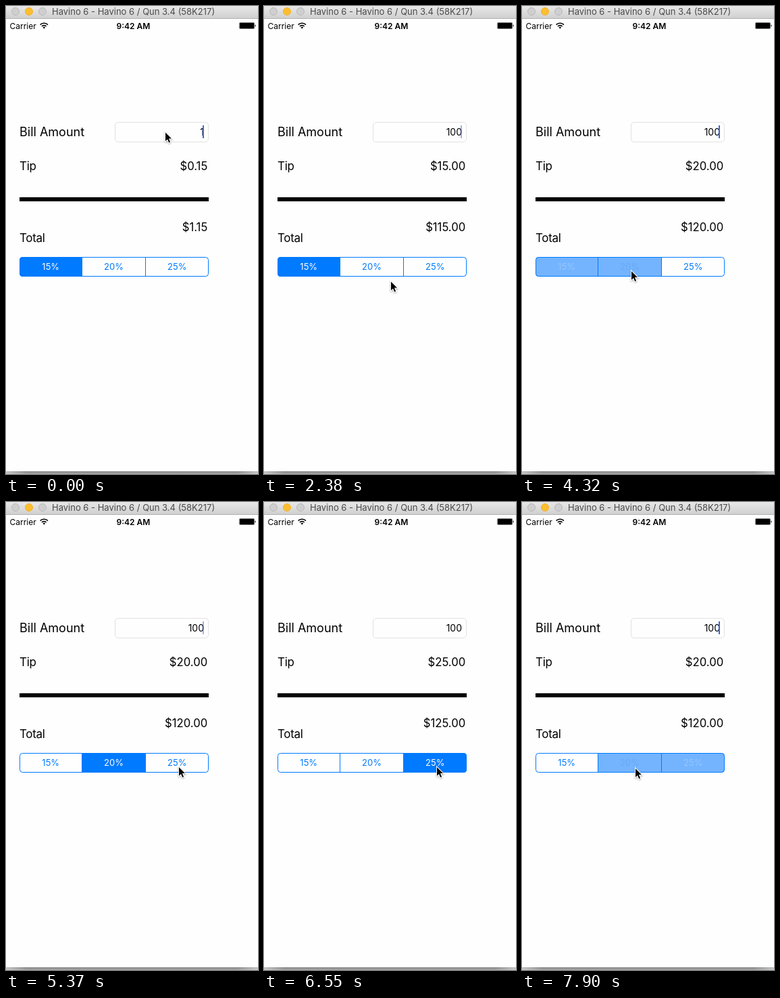
Write an HTML page that moves like this. It is 373 px wide and 690 px high and loops after 8 s.

```html
<!DOCTYPE html>
<html lang="en">
<head>
<meta charset="utf-8">
<title>Tip calculator</title>
<style>
  html, body { margin: 0; width: 100%; height: 100%; overflow: hidden; background: #fff; }
  svg { display: block; width: 100%; height: 100%; }
  text { font-family: Inter, "Liberation Sans", sans-serif; }
  .end { text-anchor: end; }
  .mid { text-anchor: middle; }
  .value { font-size: 16.7px; }
  .label { font-size: 17px; letter-spacing: -.3px; }
</style>
</head>
<body>
<svg viewBox="0 0 373 690">
  <defs>
    <linearGradient id="chrome" x2="0" y2="1">
      <stop stop-color="#e9e8e9"/><stop offset="1" stop-color="#d1d0d1"/>
    </linearGradient>
    <linearGradient id="shade" x2="0" y2="1">
      <stop stop-color="#808080"/><stop offset="1" stop-color="#adadad"/>
    </linearGradient>
    <linearGradient id="ends">
      <stop stop-color="#fff" stop-opacity=".45"/>
      <stop offset=".08" stop-color="#fff" stop-opacity="0"/>
      <stop offset=".92" stop-color="#fff" stop-opacity="0"/>
      <stop offset="1" stop-color="#fff" stop-opacity=".45"/>
    </linearGradient>
    <clipPath id="pill"><rect x="20" y="370" width="280" height="29" rx="4.5"/></clipPath>
    <filter id="soft" x="-50%" y="-50%" width="200%" height="200%">
      <feDropShadow dx="0" dy="1" stdDeviation=".8" flood-opacity=".4"/>
    </filter>
  </defs>

  <rect width="373" height="690" fill="#fefefe"/>
  <rect y="686" width="373" height="4" fill="url(#shade)"/>
  <rect y="686" width="373" height="4" fill="url(#ends)"/>

  <!-- window title bar -->
  <rect width="373" height="18" fill="url(#chrome)"/>
  <rect y="18" width="373" height="1" fill="#b3b2b3"/>
  <g fill="#d0cfd0" stroke="#b9b8b9">
    <circle cx="14" cy="8" r="5.5"/>
    <circle cx="34" cy="8" r="5.5" fill="#fdbe2f" stroke="#eeb02c"/>
    <circle cx="54" cy="8" r="5.5"/>
  </g>
  <text x="68" y="13" font-size="13" fill="#4a4a4a">Havino 6 - Havino 6 / Qun 3.4 (58K217)</text>

  <!-- status bar -->
  <text x="5.5" y="33.5" font-size="12">Carrier</text>
  <g fill="none" stroke="#000" stroke-width="1.6">
    <path d="M50.6 27.6a8 8 0 0 1 11.4 0M52.9 30a4.8 4.8 0 0 1 6.8 0"/>
    <path d="M56.3 33.6l-1.9-2a2.7 2.7 0 0 1 3.8 0z" fill="#000" stroke="none"/>
  </g>
  <text class="mid" x="188.5" y="33.5" font-size="12" font-weight="600">9:42 AM</text>
  <rect x="345.3" y="24.5" width="22.4" height="9" rx="1.5" fill="none" stroke="#000" stroke-width=".5"/>
  <rect x="346" y="25.1" width="21" height="7.8" rx=".7"/>
  <path d="M368.5 27.2a2 2 0 0 1 0 3.6z"/>

  <!-- form -->
  <text x="20" y="192" font-size="18">Bill Amount</text>
  <rect x="161.5" y="171.5" width="138" height="29" rx="4.5" fill="none" stroke="#e2e2e2"/>
  <text id="bill" class="end" x="293" y="190.5" font-size="14"></text>
  <rect id="caret" x="291" y="176" width="2" height="19" fill="#3f6bd8"/>
  <text class="label" x="20" y="241.5">Tip</text>
  <text id="tip" class="value end" x="298.3" y="241.5"></text>
  <rect x="20" y="282" width="280" height="6"/>
  <text id="total" class="value end" x="298.3" y="331.5"></text>
  <text class="label" x="20" y="347.5">Total</text>

  <g id="segments" clip-path="url(#pill)"></g>
  <path d="M112.5 370v29M206.5 370v29" stroke="#007aff"/>
  <rect x="20.5" y="370.5" width="279" height="28" rx="4" fill="none" stroke="#007aff"/>

  <g id="cursor" filter="url(#soft)">
    <path d="M1 2V14.7L4 11.9 6.2 17 8.1 16.2 5.9 11.1H10z" stroke="#fff" stroke-width="2" paint-order="stroke"/>
  </g>
</svg>
<script>
const LOOP = 8000;
const TICK = 148.4; // the screen refreshes once per tick; all times below are in ticks
const $ = id => document.getElementById(id);

const keys = [4, 6];                     // a zero is typed
const taps = [[28, 1], [42, 2], [52, 1]]; // tick, segment
const path = [[14, 235, 184.5], [16, 187, 404.5], [17, 175, 420], [21, 161, 389],
  [31, 161, 389], [34, 255, 389], [45, 255, 389], [48, 182, 391], [50, 167, 391]];

// [fill, text colour]
const looks = {
  plain: ["#fefefe", "#007aff"],
  selected: ["#007aff", "#fff"],
  pressed: ["#d8e9fd", "#007aff"],
  fadeIn: ["#74b4ff", "#69a9f4"],
  fadeOut: ["#74b4ff", "#95c5fd"]
};

const edges = [20, 112.5, 206.5, 300];
const rateOf = segment => 15 + 5 * segment;
$("segments").innerHTML = [0, 1, 2].map(i => {
  const x = edges[i], w = edges[i + 1] - x;
  return `<rect x="${x}" y="370" width="${w}" height="29"/>
    <text class="mid" x="${x + w / 2}" y="389.3" font-size="13">${rateOf(i)}%</text>`;
}).join("");
const fills = $("segments").querySelectorAll("rect");
const captions = $("segments").querySelectorAll("text");

const money = n => "$" + n.toFixed(2);

function cursorAt(n) {
  const next = path.findIndex(p => p[0] > n);
  if (next < 1) return path.at(next).slice(1);
  const a = path[next - 1], b = path[next];
  const k = (n - a[0]) / (b[0] - a[0]);
  return [1, 2].map(i => a[i] + (b[i] - a[i]) * k);
}

// Solid while typing, then fades out and in again
function caretAt(n) {
  const phase = (n - 8.9) % 6.76;
  if (n < 9 || phase > 3.53) return 1;
  return phase < 0.7 || phase > 2.7 ? 0.5 : 0;
}

// A tap shows one tick of highlight, one of cross-fade, then the new choice.
function choiceAt(n) {
  let current = 0, states = ["selected", "plain", "plain"];
  for (const [start, target] of taps) {
    if (n < start) break;
    if (n === start) states[target] = "pressed";
    else {
      const fading = n === start + 1;
      states[current] = fading ? "fadeOut" : "plain";
      states[target] = fading ? "fadeIn" : "selected";
      current = target;
    }
  }
  return { current, states };
}

function draw(t) {
  const n = Math.floor(t / TICK);
  const bill = 10 ** keys.filter(k => n >= k).length;
  const { current, states } = choiceAt(n);
  const tip = bill * rateOf(current) / 100;
  $("bill").textContent = bill;
  $("tip").textContent = money(tip);
  $("total").textContent = money(bill + tip);
  $("caret").setAttribute("opacity", caretAt(n));
  $("cursor").setAttribute("transform", `translate(${cursorAt(n)})`);
  states.forEach((state, i) => {
    const [fill, ink] = looks[state];
    fills[i].setAttribute("fill", fill);
    captions[i].setAttribute("fill", ink);
  });
}

const start = performance.now();
function tick() {
  draw((performance.now() - start) % LOOP);
  requestAnimationFrame(tick);
}
tick();
</script>
</body>
</html>
```
